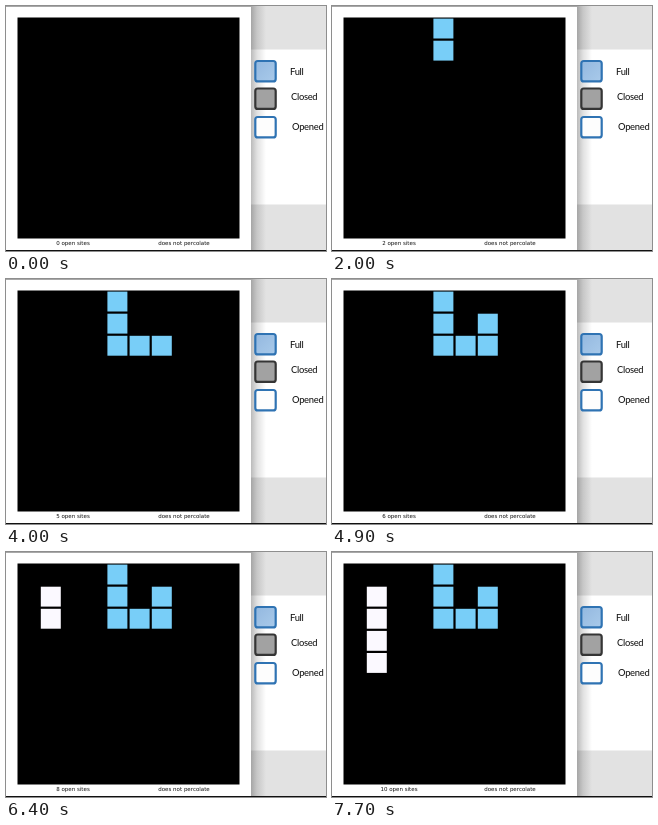
These frames come from a looping animation (320 by 245 pixels, 8 s). An HTML page:

```html
<!DOCTYPE html>
<html lang="en">
<head>
<meta charset="utf-8">
<title>Percolation</title>
<style>
  html, body { margin: 0; width: 100%; height: 100%; overflow: hidden; background: #fff; }
  svg { display: block; width: 100vw; height: 100vh; }
  .status { font: 5.5px "DejaVu Sans", sans-serif; fill: #111; text-anchor: middle; }
  .legend { font: 500 9.4px Lato, sans-serif; letter-spacing: -.3px; fill: #1c1c1c; }
</style>
</head>
<body>
<svg viewBox="0 0 320 245">
  <defs>
    <linearGradient id="shade">
      <stop offset="0" stop-opacity=".27"/>
      <stop offset=".4" stop-opacity=".12"/>
      <stop offset="1" stop-opacity="0"/>
    </linearGradient>
    <linearGradient id="blue" x2="1" y2="1">
      <stop offset="0" stop-color="#93b8df"/>
      <stop offset="1" stop-color="#a9caea"/>
    </linearGradient>
  </defs>

  <rect width="320" height="245" fill="#e2e2e2"/>
  <rect x="245" y="43.5" width="75" height="155" fill="#fff"/>
  <rect x="245" width="15" height="244" fill="url(#shade)"/>
  <rect width="245" height="244" fill="#fff"/>
  <rect width="245" height="1" fill="#a8a8a8"/>
  <rect y="244" width="320" height="1" fill="#111"/>
  <rect x="11.5" y="11.5" width="222" height="221" fill="#000"/>
  <g id="sites"></g>

  <text id="count" class="status" x="67" y="239"></text>
  <text class="status" x="178" y="239">does not percolate</text>

  <g stroke-width="2.2">
    <rect x="249.3" y="55" width="20.4" height="20.4" rx="2.5" fill="url(#blue)" stroke="#2f73b3"/>
    <rect x="249.3" y="82.5" width="20.4" height="20.4" rx="2.5" fill="#a2a2a2" stroke="#353535"/>
    <rect x="249.3" y="111" width="20.4" height="20.4" rx="2.5" fill="#fdfdfd" stroke="#2f73b3"/>
  </g>
  <g class="legend">
    <text x="284" y="68.8">Full</text>
    <text x="285" y="94.2">Closed</text>
    <text x="286" y="123.5">Opened</text>
  </g>
</svg>
<script>
  const LOOP = 8000;
  const FULL = '#78cef8', OPEN = '#fbf9ff';
  const LEFT = 11.5, TOP = 11.5, CELL_W = 22.2, CELL_H = 22.1;
  // [opening time, column, row, colour]
  const steps = [
    [1200, 4, 0, FULL], [2000, 4, 1, FULL], [2700, 4, 2, FULL],
    [3400, 5, 2, FULL], [4000, 6, 2, FULL], [4900, 6, 1, FULL],
    [5800, 1, 2, OPEN], [6400, 1, 1, OPEN], [7200, 1, 3, OPEN], [7700, 1, 4, OPEN]
  ];
  const group = document.getElementById('sites');
  const count = document.getElementById('count');

  // Each site fills the middle 90% of its cell.
  const sites = steps.map(([time, col, row, fill]) => {
    const el = document.createElementNS('http://www.w3.org/2000/svg', 'rect');
    const attrs = {
      x: LEFT + (col + .05) * CELL_W, y: TOP + (row + .05) * CELL_H,
      width: .9 * CELL_W, height: .9 * CELL_H, fill
    };
    for (const name in attrs) el.setAttribute(name, attrs[name]);
    group.appendChild(el);
    return { time, el };
  });

  function render(t) {
    let open = 0;
    for (const { time, el } of sites) {
      const shown = t >= time;
      el.setAttribute('visibility', shown ? 'visible' : 'hidden');
      if (shown) open++;
    }
    count.textContent = open + ' open sites';
  }

  const start = performance.now();
  function tick() {
    render((performance.now() - start) % LOOP);
    requestAnimationFrame(tick);
  }
  tick();
</script>
</body>
</html>
```
